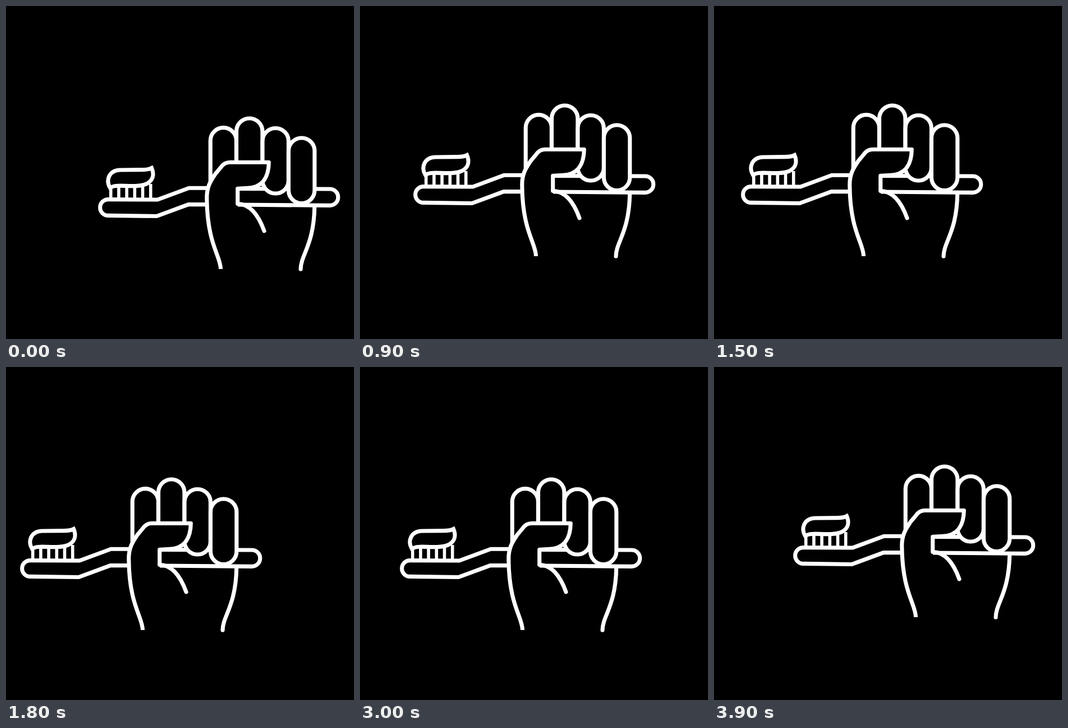
An HTML page for the animation above (4.2 s loop, 620 by 595 pixels).

```html
<!DOCTYPE html>
<html lang="en">
<head>
<meta charset="utf-8">
<title>Toothbrush in hand</title>
<style>
  html, body { margin: 0; width: 100%; height: 100%; overflow: hidden; background: #000; }
  svg { display: block; }
  .round { stroke-linecap: round; stroke-linejoin: round; }
</style>
</head>
<body>
<svg width="620" height="595" viewBox="0 0 620 595">
  <g id="art" fill="#000" stroke="#fff" stroke-width="7.1">
    <!-- back fingers -->
    <path d="M364.2 322V240.5a23.1 23.1 0 0 1 46.2 0V282"/>
    <path d="M410.5 282V223.9a23.2 23.2 0 0 1 46.4 0V282"/>
    <!-- brush -->
    <path d="M360 325.2H326L270 346L182 345.6A14.4 14.4 0 0 0 182 374.4L268.5 375.5L325 354.6H360"/>
    <path d="M413 326.5L577 327A14.6 14.6 0 0 1 577 356.4L413 355"/>
    <path id="bristles" stroke-width="5.6"/>
    <path d="M259.5 289.5C264.5 301 262 311.5 251 317.5C238 324 215 320.8 200 321.2Q190 321.4 185.5 325C177 311 184 293.5 203 293L238 292.6Q253 293 259.5 289.5Z"/>
    <!-- front fingers -->
    <rect x="457" y="218.2" width="46.4" height="116.8" rx="23.2"/>
    <rect x="503.4" y="235.7" width="46.4" height="116.8" rx="23.2"/>
    <!-- thumb and wrist -->
    <path stroke-linejoin="round" d="M382.5 470C382.5 447 358.5 425 357.8 345C357 323 365 312 373 300L383 288Q389 279.2 399 279.2H468.3C468 303 459 324.5 430 325.2L412.7 326.2V353.4"/>
    <path class="round" fill="none" d="M412.7 353.4C437 354 451 377 460 402"/>
    <path class="round" fill="none" d="M549.7 358C548.7 427 525 445 525 470.3"/>
  </g>
</svg>
<script>
const art = document.getElementById('art');
const STEP = 300;
// The hand hops sideways, up on every other step, then returns.
const shifts = [0, 23, 46, 69, 93, 116, 139, 162, 139, 116, 93, 69, 42, 23];

let bristles = '';
for (let i = 0; i < 6; i++) bristles += `M${186.7 + i * 14.2} 318V346`;
document.getElementById('bristles').setAttribute('d', bristles);

function draw(now) {
  const i = Math.floor(now / STEP) % shifts.length;
  art.setAttribute('transform', `translate(${-shifts[i]} ${i % 2 ? -23 : 0})`);
  requestAnimationFrame(draw);
}
draw(performance.now());
</script>
</body>
</html>
```
